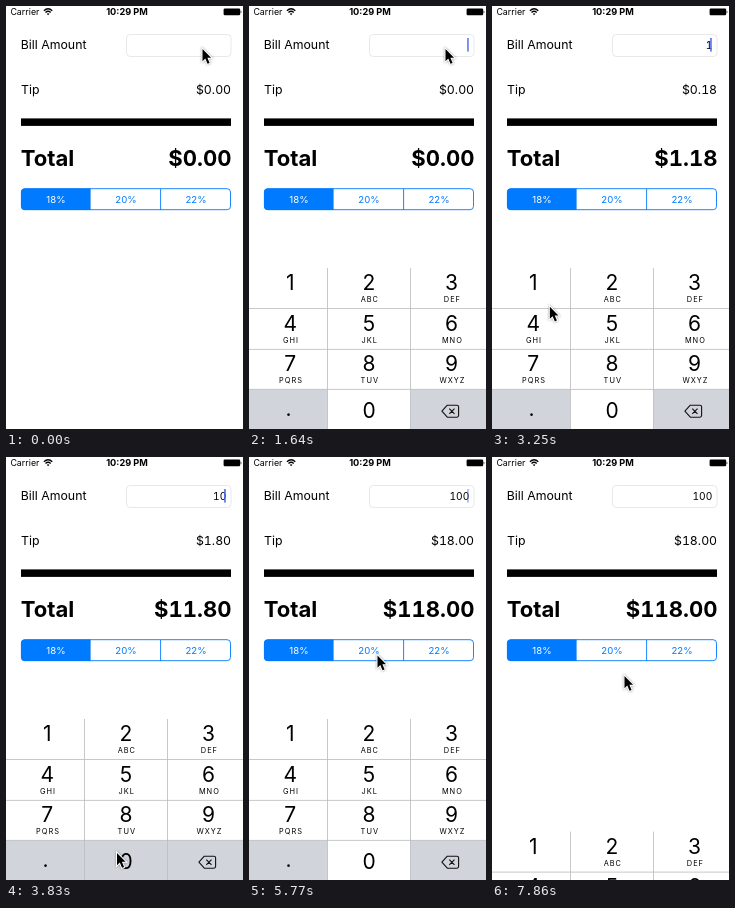
An HTML page for the animation above (8000 ms loop, 237x423 px).

```html
<!DOCTYPE html>
<html lang="en">
<head>
<meta charset="utf-8">
<title>Tip calculator</title>
<style>
  html, body { margin: 0; width: 100%; height: 100%; overflow: hidden; background: #fff; }
  svg { display: block; width: 100%; height: 100%; font: 12.3px Inter, Roboto, sans-serif; }
  .end { text-anchor: end; font-variant-numeric: tabular-nums; }
  .mid, .digit, .letters { text-anchor: middle; }
  .status { font-size: 8.9px; }
  .clock { font-weight: 700; font-size: 9.2px; }
  .total { font-weight: 700; font-size: 22.1px; }
  .value { font-size: 10.2px; }
  .segment { font-size: 9.6px; fill: #007aff; }
  .digit { font-size: 21px; }
  .letters { font-size: 7.4px; letter-spacing: 1px; }
  .rule { stroke: #b9babd; stroke-width: .8; }
</style>
</head>
<body>
<svg viewBox="0 0 237 423" preserveAspectRatio="none">
  <rect width="237" height="423" fill="#fff"/>

  <text class="status" x="4.4" y="9">Carrier</text>
  <g fill="none" stroke="#000" stroke-width="1.3">
    <path d="M37.9 4.7q4.2-4 8.4 0M39.5 6.4q2.6-2.4 5.2 0"/>
    <path d="M42.1 9.2l-1.3-1.4q1.3-1 2.6 0z" fill="#000" stroke="none"/>
  </g>
  <text class="clock mid" x="121" y="9">10:29 PM</text>
  <rect x="217.6" y="2.6" width="16.6" height="6.6" rx="1.2"/>
  <path d="M234.7 4.5q1.8 1.4 0 2.8z"/>

  <text x="14.8" y="43.1">Bill Amount</text>
  <rect x="120.5" y="28.5" width="104.5" height="22" rx="3.7" fill="#fff" stroke="#e2e2e2" stroke-width=".8"/>
  <text id="bill" class="value end" x="220.3" y="42.7"></text>
  <rect id="caret" x="218.2" y="32" width="1.5" height="13.6" fill="#4466e4"/>

  <text x="15" y="88.1">Tip</text>
  <text id="tip" class="end" x="225.1" y="88.1"></text>
  <rect x="15" y="112.4" width="210" height="7.5"/>
  <text class="total" x="14.7" y="160.1">Total</text>
  <text id="total" class="total end" x="225.5" y="160.1"></text>

  <path d="M84.6 182.4H18.7q-3.7 0-3.7 3.7v14.2q0 3.7 3.7 3.7H84.6z" fill="#007aff"/>
  <g fill="none" stroke="#007aff" stroke-width=".9">
    <rect x="15.4" y="182.7" width="209.1" height="21" rx="3.4"/>
    <path d="M154.6 183v21"/>
  </g>
  <text class="segment mid" x="50" y="196.8" style="fill:#fff">18%</text>
  <text class="segment mid" x="120" y="196.8">20%</text>
  <text class="segment mid" x="190" y="196.8">22%</text>

  <g id="keyboard"></g>

  <g id="cursor">
    <path d="M1 2V14.2L3.8 11.6 6 16.8 8.1 15.9 5.9 10.8H9.6Z" stroke="#fff" stroke-width="2"
          paint-order="stroke" style="filter:drop-shadow(0 .8px .8px #0006)"/>
  </g>
</svg>
<script>
const LOOP = 8000, BEAT = LOOP / 54;   // the screen refreshes once per beat
const KEYBOARD_HEIGHT = 161, TIP_RATE = 0.18;
const FOCUS = 3.5, BLUR = 51.6;        // beats when the field gains and loses focus
const GREY = "#d1d4db";

const taps = [
  { key: "1", down: 20, up: 22 },
  { key: "0", down: 26, up: 27 },
  { key: "0", down: 28, up: 29 }
];
const home = { x: 195.5, y: 41 };
const moves = [
  { from: 11, to: 18, x: 47, y: 281 },
  { from: 21, to: 25, x: 110, y: 394 },
  { from: 31, to: 32, x: 143, y: 211 },
  { from: 32, to: 35, x: 127.5, y: 196.5 },
  { from: 47, to: 49, x: 131.5, y: 217 }
];

const $ = id => document.getElementById(id);
const clamp = v => Math.min(1, Math.max(0, v));
const mix = (a, b, p) => a + (b - a) * p;
const money = amount => "$" + amount.toFixed(2);

function ease(from, to, beat) {
  const p = clamp((beat - from) / (to - from));
  return p * p * (3 - 2 * p);
}

function cursorAt(beat) {
  return moves.reduce((at, { from, to, x, y }) => {
    const p = ease(from, to, beat);
    return { x: mix(at.x, x, p), y: mix(at.y, y, p) };
  }, home);
}

// Blinks once a second; focusing or typing restarts the cycle.
function caretOpacity(beat, typed) {
  if (beat < FOCUS || beat > BLUR) return 0;
  const since = (beat - (typed.at(-1)?.down ?? FOCUS)) * BEAT;
  return since < 500 ? 1 : clamp(.8 - 1.6 * Math.cos((since - 850) / 1000 * 2 * Math.PI));
}

function buildKeyboard() {
  const edges = [0, 78.5, 161.5, 237], centers = [41.2, 120, 202.6];
  const top = 262, pitch = 40.5;
  const labels = ["1", "2 ABC", "3 DEF", "4 GHI", "5 JKL", "6 MNO",
                  "7 PQRS", "8 TUV", "9 WXYZ", ".", "0", ""];
  const keys = labels.map((label, i) => {
    const col = i % 3, row = Math.floor(i / 3), y = top + row * pitch;
    const [digit, letters = ""] = label.split(" ");
    const drop = row < 3 ? 22 : digit === "." ? 26.5 : 28.3;
    return `<rect data-key="${digit}" x="${edges[col]}" y="${y}" height="${pitch}"
        width="${edges[col + 1] - edges[col]}" fill="${row === 3 && col !== 1 ? GREY : "#fff"}"/>
      <text class="digit" x="${centers[col] - (digit === "." ? 1.7 : 0)}" y="${y + drop}">${digit}</text>
      <text class="letters" x="${centers[col] + .8}" y="${y + 34}">${letters}</text>`;
  });
  $("keyboard").innerHTML = keys.join("") +
    `<path class="rule" d="M78.5 262V423M161.5 262V423M0 302.5H237M0 343.4H237M0 383.4H237"/>
     <path d="M198.3 399.2H208Q209.6 399.2 209.6 400.8V409.6Q209.6 411.2 208 411.2H198.3L192.9 405.2Z
       M200.3 402.6L205.5 407.8M205.5 402.6L200.3 407.8" fill="none" stroke="#111" stroke-width="1.1"
       stroke-linejoin="round"/>`;
}

function render(time) {
  const beat = Math.min(53, Math.floor((time % LOOP + 25) / BEAT));
  const typed = taps.filter(tap => tap.down <= beat);
  const bill = typed.map(tap => tap.key).join("");
  const tip = bill * TIP_RATE;
  $("bill").textContent = bill;
  $("tip").textContent = money(tip);
  $("total").textContent = money(+bill + tip);
  $("caret").setAttribute("opacity", caretOpacity(beat, typed));

  const hidden = 1 - ease(2.6, 4.8, beat) + ease(BLUR, BLUR + 2.2, beat);
  $("keyboard").setAttribute("transform", `translate(0 ${hidden * KEYBOARD_HEIGHT})`);
  const { x, y } = cursorAt(beat);
  $("cursor").setAttribute("transform", `translate(${x} ${y})`);

  const pressed = typed.find(tap => beat < tap.up)?.key;
  for (const key of ["0", "1"])
    document.querySelector(`[data-key="${key}"]`).setAttribute("fill", key === pressed ? GREY : "#fff");
}

buildKeyboard();
const start = performance.now();
function tick() {
  render(performance.now() - start);
  requestAnimationFrame(tick);
}
tick();
</script>
</body>
</html>
```
